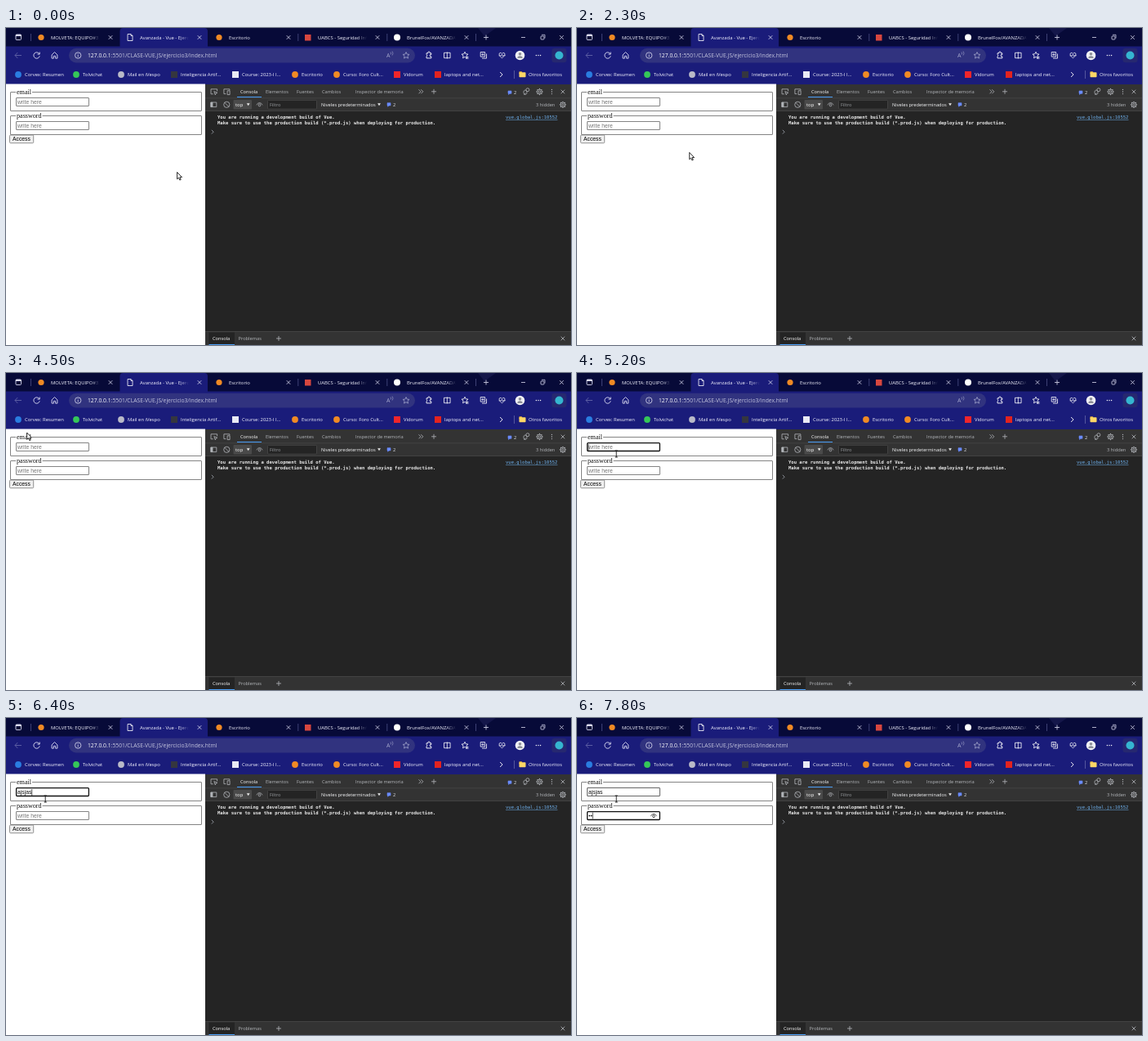
Animation, 692 px wide and 388 px high, one loop 8000 ms. Source, as an HTML page with a canvas:

```html
<!DOCTYPE html>
<html lang="es">
<head>
<meta charset="utf-8">
<style>
html, body { margin: 0; width: 100%; height: 100%; overflow: hidden; }
canvas { display: block; }
</style>
</head>
<body>
<canvas id="stage" width="692" height="388"></canvas>
<script>
const ctx = document.getElementById('stage').getContext('2d');
const UI = '"Open Sans", "Noto Sans", sans-serif';
const MONO = '"DejaVu Sans Mono", monospace';
const ARIAL = '"Liberation Sans", Arial, sans-serif';
const SERIF = '"Liberation Serif", "Times New Roman", serif';
const FRAME = '#070a38', BAR = '#1a1c7a', FIELD = '#31337f', PALE = '#dcdcf2', GREY = '#b4b7bb';

function rect(x, y, w, h, fill, r = 0) {
  ctx.fillStyle = fill;
  ctx.beginPath();
  ctx.roundRect(x, y, w, h, r);
  ctx.fill();
}
function frame(x, y, w, h, color, width = 1, r = 0) {
  ctx.strokeStyle = color;
  ctx.lineWidth = width;
  ctx.beginPath();
  ctx.roundRect(x, y, w, h, r);
  ctx.stroke();
}
function dot(x, y, r, fill) {
  ctx.fillStyle = fill;
  ctx.beginPath();
  ctx.arc(x, y, r, 0, 7);
  ctx.fill();
}
function text(str, x, y, color, size = 5.9, font = UI, weight = 400) {
  ctx.font = `${weight} ${size}px ${font}`;
  ctx.fillStyle = color;
  ctx.fillText(str, x, y);
  return x + ctx.measureText(str).width;
}
// Icons are paths around their own centre.
function icon(path, x, y, color = PALE, width = .8, fill) {
  const p = new Path2D(path);
  ctx.save();
  ctx.translate(x, y);
  if (fill) { ctx.fillStyle = fill; ctx.fill(p); }
  ctx.strokeStyle = color;
  ctx.lineWidth = width;
  ctx.stroke(p);
  ctx.restore();
}
const ring = r => `M${r} 0A${r} ${r} 0 1 1 ${-r} 0A${r} ${r} 0 1 1 ${r} 0Z`;
const CROSS = 'M-2.3-2.3L2.3 2.3M2.3-2.3L-2.3 2.3';
const PLUS = 'M-3 0H3M0-3V3';
const STAR = 'M0-4L1.2-1.4L4-1.1L1.9 .8L2.5 3.6L0 2.2L-2.5 3.6L-1.9 .8L-4-1.1L-1.2-1.4Z';
const EYE = 'M-3.8 .5Q0-4.5 3.8 .5M1.4 .8A1.4 1.4 0 1 1-1.4 .8A1.4 1.4 0 1 1 1.4 .8';
const DOC = 'M-3-4H1L3-2V4H-3ZM1-4V-2H3';
const ARROW = 'M0 0V8.4L1.9 6.7L3.2 9.6L4.6 9L3.3 6.2H5.9Z';
const IBEAM = 'M-1.6-4H1.6M0-4V4M-1.6 4H1.6';
const DOWN = 'M-1.7-1.3H1.7L0 1.5Z';

function gear(x, y) {
  icon(ring(1.3) + ring(2.9), x, y, GREY, .8);
  for (let i = 0; i < 8; i++) {
    const a = i * Math.PI / 4;
    dot(x + 3.5 * Math.cos(a), y + 3.5 * Math.sin(a), .65, GREY);
  }
}
function dots(x, y, dx, dy, color) {
  for (const i of [-1, 0, 1]) dot(x + i * dx, y + i * dy, .7, color);
}
function bubble(x, y) {
  icon('M-2-2H2V1.2H0L-1.4 2.6V1.2H-2Z', x, y, '#6b8cff', .6, '#6b8cff');
  text('2', x + 5, y + 2.2, '#dfe1e5', 5.7);
}

function tab(x, title, bg) {
  ctx.save();
  ctx.beginPath();
  ctx.rect(x + 12, 2, 60, 20);
  ctx.clip();
  text(title, x + 12, 13.6, '#f4f4ff');
  const fade = ctx.createLinearGradient(x + 60, 0, x + 72, 0);
  fade.addColorStop(0, bg + '00');
  fade.addColorStop(1, bg);
  rect(x + 60, 2, 12, 20, fade);
  ctx.restore();
  icon(CROSS, x + 85, 11.5);
}

function drawBrowser() {
  rect(0, 0, 692, 70, FRAME);
  icon('M578 0L600 0L586 10Z', 0, 0, '#15174a', .1, '#15174a');
  rect(139.5, 0, 107.5, 24, BAR, [4, 4, 0, 0]);
  rect(0, 22.5, 692, 47, BAR);

  frame(12, 8, 6.5, 6.5, PALE, .9, 1);
  rect(12, 8, 6.5, 2, PALE);
  for (const x of [30, 357.5, 466.5, 575]) rect(x, 7, .7, 9, '#555890');
  tab(43, 'MOLVETA: EQUIPO#3. - Avanzada', FRAME);
  tab(152, 'Avanzada - Vue - Ejercicio', BAR);
  tab(261, 'Escritorio', FRAME);
  tab(370, 'UABCS - Seguridad Informática', FRAME);
  tab(479, 'BrunelFox/AVANZADA', FRAME);
  dot(43, 11.5, 3.6, '#f08a24');
  icon(DOC, 152, 11.5, '#fff');
  dot(261, 11.5, 3.6, '#f08a24');
  rect(366, 8, 7.5, 7.5, '#d8473f');
  dot(479, 11.5, 4, '#fff');
  icon(PLUS, 588, 11.5);
  icon('M-2.5 0H2.5', 633.5, 11.5);
  frame(655, 10, 4, 4, PALE, .8, .8);
  icon('M-1-3.2H3V1', 657, 11.5, PALE, .7);
  icon(CROSS, 680.5, 11.5);

  icon('M4 0H-4M-.8-3.4L-4 0L-.8 3.4', 15, 33.5, '#6265a8', .9);
  icon('M3.4-1.6A3.7 3.7 0 1 0 3.7 .8M3.7-4V-1.4H1', 37.5, 33.5, PALE, .9);
  icon('M-3.4-.4L0-3.8L3.4-.4V3.8H1.1V1H-1.1V3.8H-3.4Z', 59.5, 33.3, PALE, .9);
  rect(77, 24.8, 424, 17.6, FIELD, 8.8);
  icon(ring(3.7) + 'M0-.6V2M0-2.1V-1.3', 88.2, 33.5);
  const end = text('127.0.0.1', 100, 35.9, '#fff', 6.78);
  text(':5501/CLASE-VUE.JS/ejercicio3/index.html', end, 35.9, '#c3c4de', 6.78);
  text('A', 466, 36, '#a3a5cc', 7);
  icon('M0-1Q1.2 .5 0 2M2-2Q4 .5 2 3', 471, 30.5, '#a3a5cc', .6);
  icon(STAR, 490, 33.5, '#a3a5cc');
  icon('M-3-2.5H-1A1.2 1.2 0 1 1 1-2.5H2.8V-.7A1.2 1.2 0 1 0 2.8 1.5V3.6H-3V1.4A1.2 1.2 0 0 0-3-.8Z', 518, 33.3, '#fff', .9);
  icon('M-3.8-3.2H3.8V3.2H-3.8ZM0-4V4', 540.3, 33.5, '#fff');
  icon(STAR, 562, 33.2, '#fff');
  icon('M1 4H4.5M2 2.4H4.5', 562, 33.2, '#fff');
  icon('M-3.8-3.8H1.6V1.8H-3.8ZM3.5-1.8V3.8H-2M-1-2.6V.7M-2.7-1H.6', 585, 33.3, '#fff');
  icon('M0 3.4L-3.4 0Q-4.2-3.4-1.4-3.3L0-2L1.4-3.3Q4.2-3.4 3.4 0ZM-3.8 .4H-1L0-1.2L1 1L1.6 .2H4', 607.5, 33.5, '#fff', .7);
  dot(629.5, 33.5, 5.8, '#f1f1f4');
  dot(629.5, 31.8, 1.8, '#8d8f99');
  rect(626.4, 34.2, 6.2, 2.9, '#8d8f99', [2.5, 2.5, 0, 0]);
  dots(652, 33.5, 2.6, 0, '#fff');
  rect(668.5, 24.8, 18, 17.5, '#262870', 3);
  dot(677.5, 33.5, 5, '#35b5d0');

  const links = [
    [15, 'Corvex: Resumen', '#2a7de1'], [86, 'Tolvichat', '#35c759'],
    [141, 'Mail en iVespo', '#b9bac8'], [206, 'Inteligencia Artif...', '#35363f', 1],
    [281, 'Course: 2023-I I...', '#e9eaf5', 1], [354, 'Escritorio', '#f08a24'],
    [405, 'Curso: Foro Cult...', '#f08a24'], [479, 'Vidorum', '#f0252b', 1],
    [529, 'laptops and net...', '#e3231f', 1]
  ];
  for (const [x, label, color, square] of links) {
    if (square) rect(x - 4, 53, 8, 8, color);
    else dot(x, 57, 3.9, color);
    text(label, x + 8, 59.1, '#f4f4ff');
  }
  icon('M-1.4-3L1.6 0L-1.4 3', 606.5, 57, '#fff', .9);
  rect(622, 52, .8, 10, '#6567a8');
  rect(628.5, 53.2, 3.6, 3, '#e8b23a', .6);
  rect(628.5, 54.3, 8, 6, '#ffd766', .8);
  text('Otros favoritos', 640, 59.1, '#f4f4ff');
}

function drawDevTools() {
  rect(244, 69, 448, 319, '#242424');
  rect(244, 69, 448, 32.5, '#333333');
  rect(244, 85.5, 448, .7, '#484848');
  rect(244, 101.2, 448, .8, '#484848');

  icon('M-1 2.8H-3.8V-3.2H3.8V-.6M0-.4L4 1.3L2.2 2L1.5 3.8Z', 254.8, 78, GREY);
  icon('M-1 2.6H-3.4V-3.2H3.6V-1.6M.8-1.2H3.8V3.6H.8Z', 270.3, 78, GREY);
  const tabs = [[287, 'Consola'], [318, 'Elementos'], [356, 'Fuentes'], [387, 'Cambios'], [428, 'Inspector de memoria']];
  for (const [x, label] of tabs) text(label, x, 80.1, x < 300 ? '#fff' : GREY, 5.7);
  rect(283, 84, 30, 1, '#4a9df5');
  icon('M-2.5-2.5L0 0L-2.5 2.5M.3-2.5L2.8 0L.3 2.5', 508, 77.8, GREY);
  icon(PLUS, 524, 77.8, GREY);
  bubble(617, 79);
  icon('M-3.4 1.2A2 2 0 1 1 .4 1.2A2 2 0 1 1-3.4 1.2M-.6-1.8A2 2 0 1 1 3.4-1.8A2 2 0 1 1-.6-1.8M-3.2 4L-1 2.4', 637.5, 77.5, GREY);
  gear(653.5, 78);
  dots(668.5, 78, 0, 2.6, GREY);
  icon(CROSS, 682, 78, GREY);

  icon('M-3.5-2.8H3.5V2.8H-3.5ZM-1.4-2.8V2.8', 254.3, 93.8, GREY);
  icon('M-3.5-2.8H-1.4V2.8H-3.5Z', 254.3, 93.8, GREY, .3, GREY);
  icon(ring(3.6) + 'M-2.5-2.5L2.5 2.5', 270.3, 93.8, GREY);
  rect(278.5, 88, 22.5, 11.5, '#4a4a4a', 1);
  text('top', 281, 95.9, '#fff', 5.9);
  icon(DOWN, 296.7, 93.6, '#eee', .2, '#eee');
  icon(EYE, 310.5, 93.6, GREY);
  rect(320.5, 88.4, 60, 10.8, '#242424', 1);
  frame(320.5, 88.4, 60, 10.8, '#4c4c4c', .7, 1);
  text('Filtro', 323, 95.9, '#9a9da1', 5.7);
  text('Niveles predeterminados', 386, 95.9, '#f4f5f7', 5.7);
  icon(DOWN, 457, 93.6, '#eee', .2, '#eee');
  bubble(469, 93.7);
  text('3 hidden', 649, 95.9, GREY, 5.7);
  gear(682, 93.8);

  text('You are running a development build of Vue.', 259, 111, '#e8e8e8', 5.56, MONO, 700);
  text('Make sure to use the production build (*.prod.js) when deploying for production.', 259, 118.2, '#e8e8e8', 5.56, MONO, 700);
  text('vue.global.js:10552', 612, 111, '#6fb1ee', 5.56, MONO);
  rect(612, 111.9, 63.5, .6, '#6fb1ee');
  icon('M-1.2-2.4L1.2 0L-1.2 2.4', 253, 127.2, '#a4aab4');

  rect(244, 371.3, 448, 16.7, '#333333');
  rect(244, 371.2, 448, .7, '#4a4a4a');
  rect(248.5, 372.5, 31.5, 15.5, '#242424');
  rect(248.5, 387, 31.5, 1, '#4a9df5');
  text('Consola', 253, 382.3, '#fff', 5.7);
  text('Problemas', 284.5, 382.3, GREY, 5.7);
  icon(PLUS, 334, 380, GREY);
  icon(CROSS, 682, 380, GREY);
}

function field(y, legend, border, focused) {
  frame(5.5, y + .5, 234, 23, '#777', .9, .5);
  rect(12, y - 1, 20 + (legend.length - 5) * 4.2, 3, '#fff');
  text(legend, 13, y + 2.5, '#111', 8.1, SERIF);
  if (focused) frame(12.6, y + 7.6, 88.8, 9.9, '#101010', 1.3, 1);
  else frame(12.5, y + 7.5, 89, 10, border, .9, .4);
}
function caret(x, y) {
  rect(x, y - 4, .7, 8, '#111');
}

function drawPage(t) {
  rect(0, 68.5, 244, 319.5, '#fff');
  const email = t >= 5200 && t < 6700, password = t >= 6700;
  field(78, 'email', t >= 4800 ? '#555' : '#777', email);
  field(107, 'password', '#777', password);

  const typed = 'ajsjas'.slice(0, t < 6000 ? 0 : t < 6400 ? (t - 5900) / 100 : 6);
  const end = text(typed || 'write here', 14, 93.2, typed ? '#111' : '#757575', 6.76, ARIAL);
  if (email && (t < 5800 || t >= 6000)) caret(typed ? end + .2 : 13.8, 91);

  const bullets = t >= 7800 ? 2 : t >= 7500 ? 1 : 0;
  if (!bullets) text('write here', 14, 121.6, '#757575', 6.76, ARIAL);
  for (let i = 0; i < bullets; i++) dot(15.3 + 2.4 * i, 119.6, .95, '#111');
  if (password && (t < 7200 || bullets)) caret(13.8 + 2.5 * bullets, 119.4);
  if (bullets) icon(EYE, 94, 119.5, '#222');

  rect(4.5, 131, 29.2, 9.8, '#efefef', 1.2);
  frame(4.5, 131, 29.2, 9.8, '#777', .8, 1.2);
  text('Access', 8.1, 138.3, '#000', 6.76, ARIAL);
}

// Pointer path: time, x, y
const PATH = [[0, 209.6, 176.5], [900, 213.7, 164.5], [2000, 213.7, 164.5], [2400, 112.4, 148.3],
  [4100, 112.4, 148.3], [4500, 25.6, 73], [4600, 25.6, 73], [4900, 48.2, 99], [8000, 48.2, 99]];

function drawPointer(t) {
  const i = PATH.findIndex(p => p[0] > t);
  const [t0, x0, y0] = PATH[i - 1], [t1, x1, y1] = PATH[i];
  const k = (t - t0) / (t1 - t0);
  const x = x0 + (x1 - x0) * k, y = y0 + (y1 - y0) * k;
  if (t >= 4800) icon(IBEAM, x, y, '#111', .9);
  else icon(ARROW, x, y, '#111', .9, '#fff');
}

let start;
function draw(now) {
  start ??= now;
  const t = Math.floor((now - start) % 8000 / 100) * 100;
  drawBrowser();
  drawDevTools();
  drawPage(t);
  drawPointer(t);
  requestAnimationFrame(draw);
}
requestAnimationFrame(draw);
</script>
</body>
</html>
```
